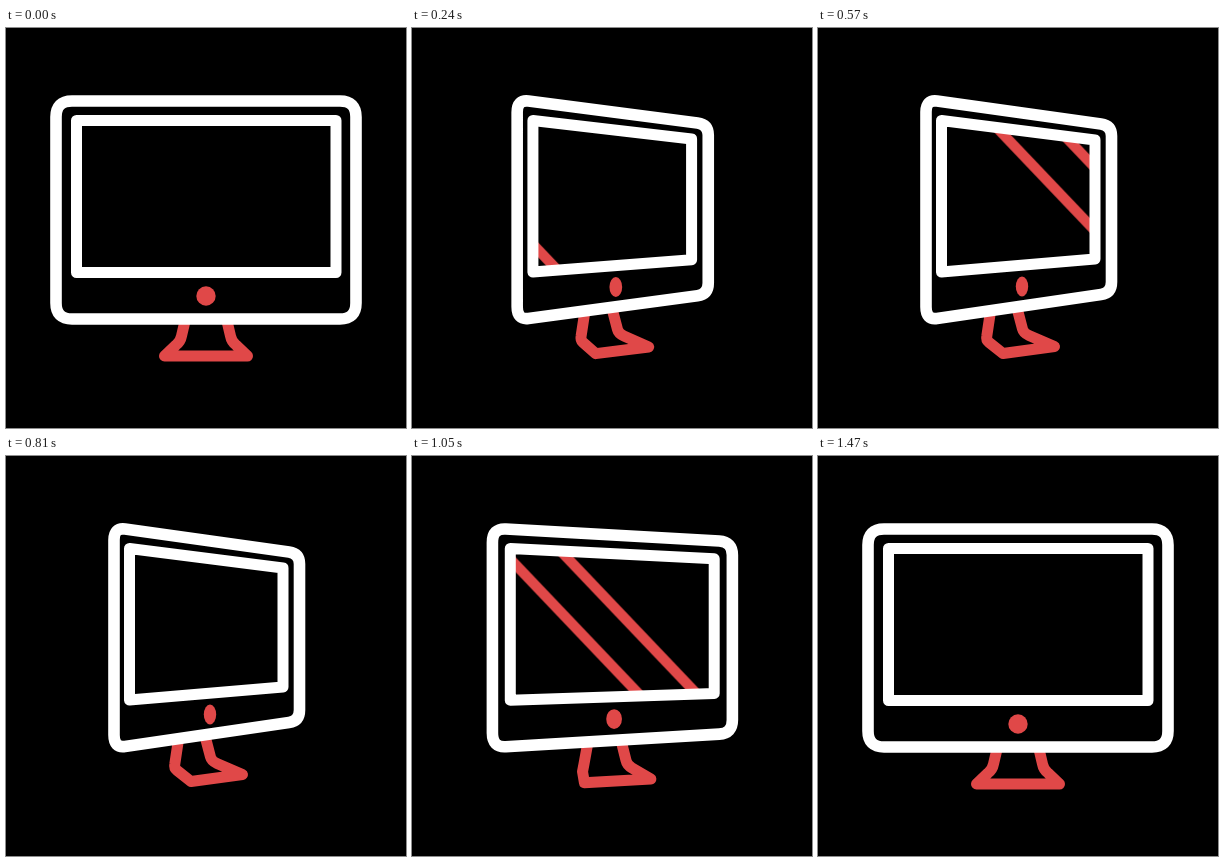
Write an HTML page that moves like this. It is 400 px wide and 400 px high and loops after 1.62 s.

```html
<!DOCTYPE html>
<html lang="en">
<head>
<meta charset="utf-8">
<title>Turning monitor</title>
<style>
  html, body { margin: 0; height: 100%; overflow: hidden; background: #000; }
  svg { display: block; width: 100vw; height: 100vh; }
  path { fill: none; stroke-linejoin: round; }
  .white { stroke: #fff; }
  .red { stroke: #e04848; }
  .dot { fill: #e04848; }

  .case, .glass, .foot, .dot, .second {
    animation: 1620ms cubic-bezier(.45, 0, .55, 1) infinite;
  }
  .case { stroke-width: 11.6; animation-name: case; }
  .glass { stroke-width: 11; animation-name: glass; }
  .foot { stroke-width: 11; animation-name: foot; }
  .dot { animation-name: dot; }
  .shine { stroke-width: 10.4; }
  .second { animation-name: gap; }
  .sweep { animation: sweep 1620ms linear infinite; }

  /* Front view, then turned to the right and back; both paths share their commands */
  @keyframes case {
    0%, 74%, 100% { d: path("M66 73L334 73Q350 73 350 89L350 275Q350 291 334 291L66 291Q50 291 50 275L50 89Q50 73 66 73Z"); }
    17.78%, 56.23% { d: path("M119 73L283 96Q293.5 97.5 293.5 108L293.5 254Q293.5 265 283 266.5L119 290.4Q108 292 108 279L108 84Q108 71.5 119 73Z"); }
  }
  @keyframes glass {
    0%, 74%, 100% { d: path("M70.5 92.5L330 92.5L330 244.5L70.5 244.5Z"); }
    17.78%, 56.23% { d: path("M123.5 92.5L277 112L277 231L123.5 244Z"); }
  }
  @keyframes foot {
    0%, 74%, 100% { d: path("M179.5 291L175.5 308Q174.5 313.5 170 317L158.5 328L241.5 328L230 317Q225.5 313.5 224.5 308L220.5 291"); }
    17.78%, 56.23% { d: path("M173 280L168.8 308Q168 312 171 314.3L185 325.5L236.5 318.5L211 307.5Q205.5 305 204.5 301L199 280"); }
  }
  @keyframes dot {
    0%, 74%, 100% { cx: 200px; cy: 268px; rx: 9.7px; ry: 9.7px; }
    17.78%, 56.23% { cx: 204px; cy: 258.5px; rx: 6.2px; ry: 10px; }
  }

  /* Two passes of the reflection */
  @keyframes sweep {
    0% { transform: translateX(-160px); }
    49.99% { transform: translateX(402px); }
    50% { transform: translateX(-16.5px); }
    90.74%, 100% { transform: translateX(441px); }
  }
  @keyframes gap {
    0%, 74%, 100% { transform: translateX(-56px); }
    17.78%, 56.23% { transform: translateX(-60px); }
  }
</style>
</head>
<body>
<svg viewBox="0 0 400 400">
  <clipPath id="screen"><path class="glass"/></clipPath>
  <path class="foot red"/>
  <g clip-path="url(#screen)">
    <g class="sweep">
      <path class="shine red" d="M-40 55L180 286"/>
      <path class="shine red second" d="M-40 55L180 286"/>
    </g>
  </g>
  <path class="case white"/>
  <path class="glass white"/>
  <ellipse class="dot"/>
</svg>
</body>
</html>
```
